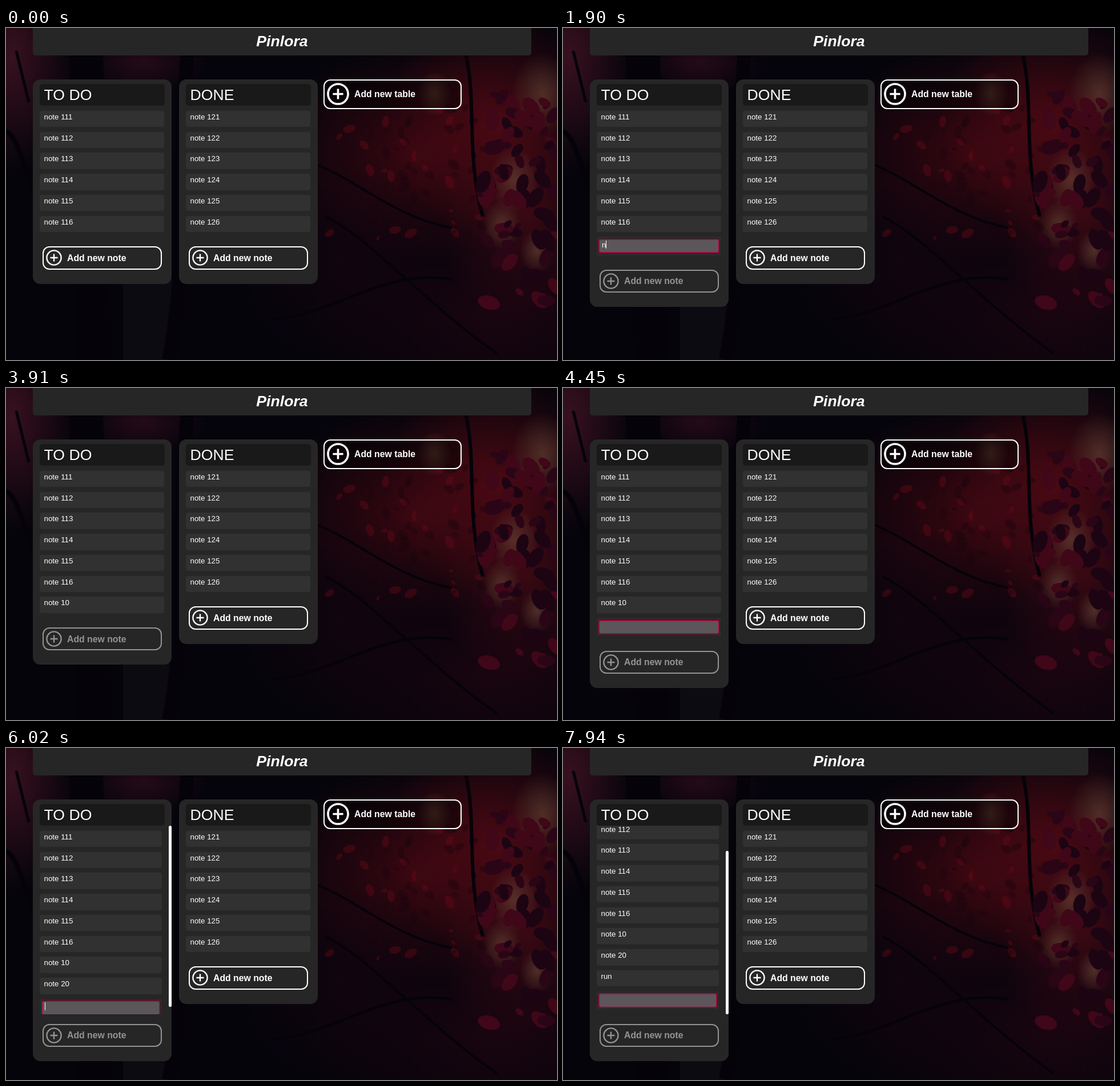
Write an HTML page with a canvas that moves like this. It is 965 by 581 pixels and loops after 8 s.

```html
<!DOCTYPE html>
<html lang="en">
<head>
<meta charset="utf-8">
<title>Task board</title>
<style>
* { box-sizing: border-box; margin: 0; }
html, body { width: 965px; height: 581px; overflow: hidden; background: #06040b; }
body {
  position: relative; color: #fff;
  font: 13.333px/15px "Liberation Sans", Arial, sans-serif;
}
canvas { position: absolute; left: 0; top: 0; }
h1 {
  position: absolute; left: 47px; top: 0; width: 873px; height: 48px;
  background: #262626; border-radius: 0 0 5px 5px;
  font: italic bold 26.67px/46px "Liberation Sans", Arial, sans-serif; text-align: center;
}
.col {
  position: absolute; top: 90.4px; width: 243px; padding: 7.5px 0 25px;
  background: #262626; border-radius: 13px;
}
h2 {
  height: 38px; margin: 0 12.5px 0 11.5px; padding-left: 8px;
  background: #191919; border-radius: 5px; font-size: 26.67px; font-weight: 400; line-height: 38px;
}
.list { position: relative; max-height: 330px; overflow: hidden; }
.inner { display: flow-root; padding: 9px 13px 0 11.5px; }
.scroll .inner { padding-right: 17px; }
.note {
  height: 28.5px; margin-bottom: 8.25px; padding: 3px 8px;
  background: #313131; border-radius: 4px;
}
.edit { height: 32.25px; margin-bottom: 8.25px; padding: 3.5px; background: #2f2f2f; border-radius: 4px; }
.field {
  height: 25.5px; padding: 1px 4px; white-space: pre;
  background: #5c565b; border: 2px solid #a00a3a; border-radius: 4px; box-shadow: 0 0 4px #0008;
}
.caret { display: inline-block; width: 1px; height: 14px; vertical-align: top; background: #fff; }
.thumb { position: absolute; right: 0; width: 5px; background: #fff; border-radius: 3px; display: none; }
.scroll .thumb { display: block; }
.add { position: relative; width: 209px; height: 40.2px; margin: 17px 0 0 17px; }
.btn {
  display: flex; align-items: center; gap: 9px; height: 100%; padding-left: 4px;
  border: 2px solid #fff; border-radius: 12px; font-size: 15.8px; font-weight: bold;
}
.busy .btn { opacity: .5; }
.table { position: absolute; left: 556px; top: 90.4px; width: 242px; height: 51.2px; }
.table .btn { background: #0006; }
.flash { position: absolute; inset: 0; background: #33b5e566; opacity: 0; }
.touch {
  position: absolute; left: 172px; top: 388px; width: 18px; height: 18px; border-radius: 50%;
  background: #1a1619cc; border: 1px solid #55505588; opacity: 0;
}
</style>
</head>
<body>
<canvas width="965" height="581"></canvas>
<h1>Pinlora</h1>
<div class="table"></div>
<div class="touch"></div>
<script>
const $ = (sel, root = document) => root.querySelector(sel);

// Backdrop: dark red wood
const ctx = $('canvas').getContext('2d');
let seed = 11;
const rand = () => (seed = seed * 16807 % 2147483647) / 2147483647;

function glow(x, y, rx, ry, color) {
  ctx.save();
  ctx.translate(x, y);
  ctx.scale(rx, ry);
  const g = ctx.createRadialGradient(0, 0, 0, 0, 0, 1);
  g.addColorStop(0, color);
  g.addColorStop(1, color.slice(0, 7) + '00');
  ctx.fillStyle = g;
  ctx.fillRect(-1, -1, 2, 2);
  ctx.restore();
}

function limb(path, width) {
  ctx.strokeStyle = '#050309';
  ctx.lineWidth = width;
  ctx.stroke(new Path2D(path));
}

function leaves(count, x, y, w, h, size, colors) {
  for (let i = 0; i < count; i++) {
    const r = size * (.5 + rand());
    ctx.fillStyle = colors[i % colors.length];
    ctx.beginPath();
    ctx.ellipse(x + rand() * w, y + rand() * h, r, r * .6, rand() * 3, 0, 7);
    ctx.fill();
  }
}

function backdrop() {
  ctx.fillStyle = '#06040b';
  ctx.fillRect(0, 0, 965, 581);
  glow(10, 50, 110, 200, '#4a1526bb');
  glow(240, 60, 110, 55, '#2c0c1ccc');
  glow(720, 220, 260, 190, '#3e0711dd');
  glow(860, 170, 200, 200, '#560a14cc');
  glow(910, 330, 150, 190, '#440a14cc');
  glow(860, 500, 340, 190, '#25051299');
  glow(590, 400, 180, 180, '#18051099');
  for (const [x, y, r] of [[940, 115, 55], [890, 265, 44], [750, 115, 30], [868, 345, 34], [930, 390, 30]])
    glow(x, y, r, r * 1.3, '#6a483899');
  ctx.fillStyle = '#0c0b11';
  ctx.fillRect(205, 440, 90, 141);
  leaves(70, 560, 140, 280, 230, 8, ['#16040c66', '#6a0a1666', '#1c051066']);
  limb('M140 40L155 581', 60);
  limb('M318 40C300 250 320 400 285 581', 24);
  limb('M0 180C30 200 30 270 60 290', 9);
  limb('M18 40L40 130', 5);
  limb('M805 45C825 130 805 220 835 330', 6);
  limb('M546 240C620 270 680 330 780 350', 4);
  limb('M470 510C580 500 660 420 780 440', 5);
  limb('M560 330C640 370 720 470 860 570', 4);
  leaves(70, 835, 110, 130, 380, 14, ['#1c0413', '#3f0718', '#2a0516']);
}

// Board
const button = (label, size, stroke) => `<div class="btn">
  <svg width="${size}" height="${size}" viewBox="-14 -14 28 28" fill="none" stroke="#fff" stroke-width="${stroke}">
  <circle r="12.6"/><path d="M-6.5 0H6.5M0-6.5V6.5"/></svg>${label}</div>`;
const note = text => `<div class="note">${text}</div>`;
const numbered = from => Array.from({ length: 6 }, (_, i) => note(`note ${from + i}`)).join('');

function column(left, title, from) {
  const el = document.createElement('section');
  el.className = 'col';
  el.style.left = left + 'px';
  el.innerHTML = `<h2>${title}</h2>
    <div class="list"><div class="inner">${numbered(from)}</div><div class="thumb"></div></div>
    <div class="add">${button('Add new note', 28, 2.4)}<div class="flash"></div></div>`;
  document.body.insertBefore(el, $('.touch'));
  return el;
}

// [time, field text or null, caret hidden]
const typing = [
  [0, null], [500, ''], [1040, '', 1], [1500, ''],
  [1900, 'n'], [1970, 'no'], [2280, 'not'], [2360, 'note'], [2820, 'note', 1],
  [2970, 'note '], [3140, 'note 1'], [3210, 'note 10'], [3690, 'note 10', 1],
  [3910, null], [3990, ''], [4450, '', 1],
  [4850, 'n'], [5000, 'no'], [5170, 'not'], [5240, 'note'],
  [5470, 'note '], [5630, 'note 2'], [5700, 'note 20'],
  [6020, ''], [6480, '', 1], [6940, 'r'], [7020, 'ru'], [7180, 'run'],
  [7410, ''], [7940, '', 1]
];
const saved = [[3910, 'note 10'], [6020, 'note 20'], [7410, 'run']];
const LOOP = 8000, VIEW = 330, ROW = 36.75, EDIT = 40.5;

backdrop();
$('.table').innerHTML = button('Add new table', 39, 2.6);
const todo = column(47, 'TO DO', 111);
column(303, 'DONE', 121);
const list = $('.list', todo), inner = $('.inner', todo), thumb = $('.thumb', todo);
const flash = $('.flash', todo), touch = $('.touch');
let shown = -1;

function showStep(i) {
  const [time, text, hidden] = typing[i];
  const extra = saved.filter(s => s[0] <= time);
  const editing = text !== null;
  const caret = hidden ? '' : '<i class="caret"></i>';
  inner.innerHTML = numbered(111) + extra.map(s => note(s[1])).join('') +
    (editing ? `<div class="edit"><div class="field">${text}${caret}</div></div>` : '');
  const height = 9 + (6 + extra.length) * ROW + (editing ? EDIT : 0);
  const offset = time >= 7410 ? height - VIEW : 0;
  inner.style.transform = `translateY(${-offset}px)`;
  list.classList.toggle('scroll', height > VIEW);
  thumb.style.top = offset / height * VIEW + 'px';
  thumb.style.height = VIEW / height * VIEW + 'px';
  todo.classList.toggle('busy', time >= 500);
}

const start = performance.now();
function frame() {
  const t = (performance.now() - start) % LOOP;
  const i = typing.findLastIndex(s => s[0] <= t);
  if (i !== shown) showStep(shown = i);
  flash.style.opacity = touch.style.opacity = t < 500 || t >= 730 ? 0 : t < 660 ? 1 : .5;
  requestAnimationFrame(frame);
}
frame();
</script>
</body>
</html>
```
